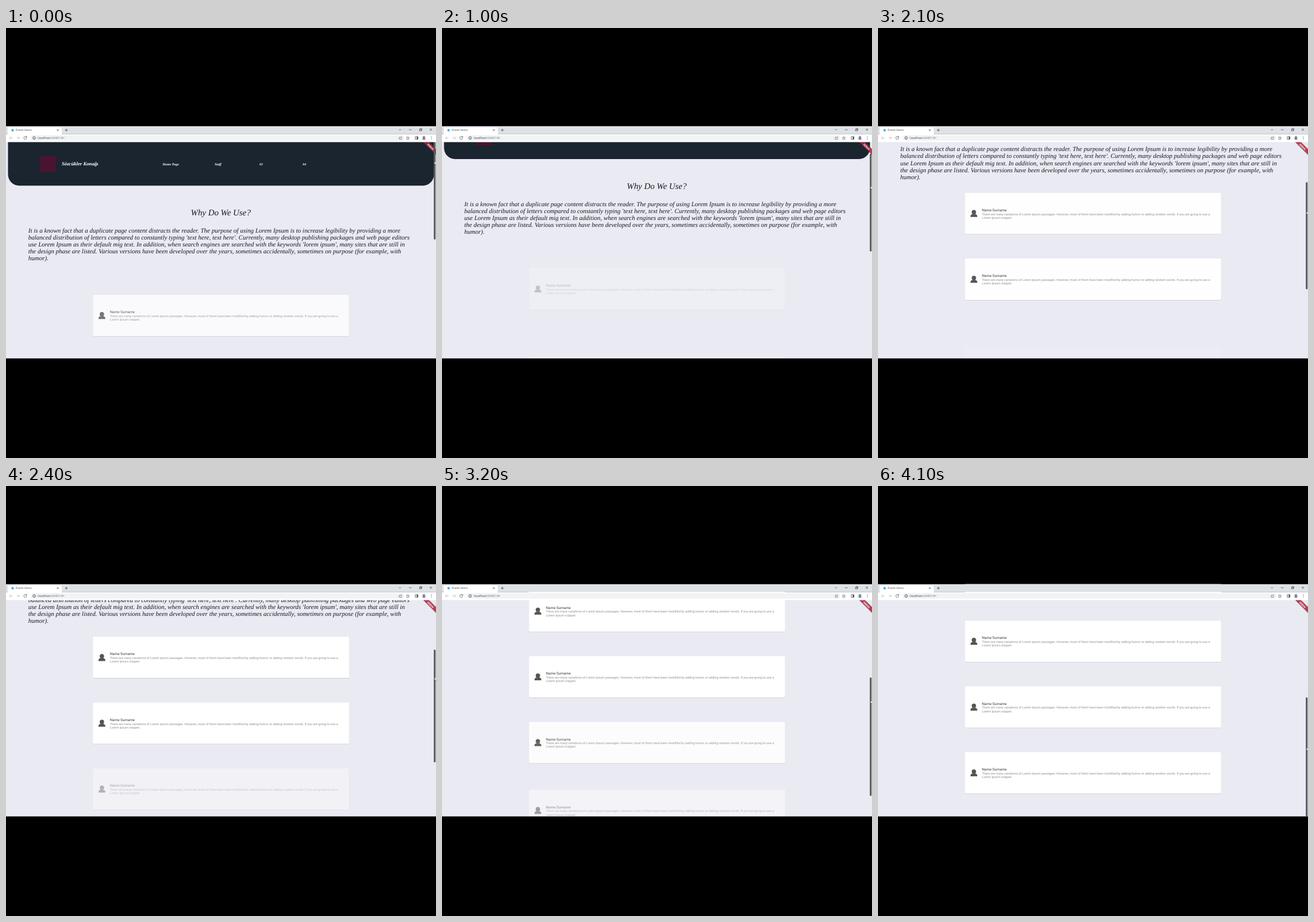
Write an HTML page that moves like this. It is 748 px wide and 748 px high and loops after 4.2 s.

```html
<!DOCTYPE html>
<html lang="en">
<head>
<meta charset="utf-8">
<title>Scrolling page</title>
<style>
  html, body { margin: 0; width: 100%; height: 100%; overflow: hidden; background: #000; }
  svg { display: block; width: 748px; height: 748px; text-rendering: geometricPrecision; }
  .serif { font-family: "Liberation Serif", serif; font-style: italic; fill: #171a21; }
  .nav { font-weight: bold; font-size: 5.9px; fill: #fff; }
  .card { font: 5.44px Roboto, sans-serif; fill: #8d8d8d; }
  .ui { font-family: "Open Sans", sans-serif; fill: #33363b; }
  .line { fill: none; stroke: #45484d; stroke-width: .8; }
</style>
</head>
<body>
<svg viewBox="0 0 748 748">
  <defs>
    <g id="card" class="card">
      <rect x="151.2" y=".8" width="445.6" height="71.8" rx="1.5" fill="#c9cad3"/>
      <rect x="151.2" width="445.6" height="71.8" rx="1.5" fill="#fff"/>
      <g fill="#555">
        <circle cx="166.8" cy="33.7" r="3.8"/>
        <path d="M160.9 42.1v-1.5c0-2.5 2.7-3.8 5.9-3.8s5.9 1.3 5.9 3.8v1.5z"/>
      </g>
      <text x="180.8" y="32.2" font-size="6.25" fill="#3a3a3a">Name Surname</text>
      <text x="180.8" y="38.9">There are many variations of Lorem Ipsum passages. However, most of them have been modified by adding humor or adding random words. If you are going to use a</text>
      <text x="180.8" y="45.1">Lorem Ipsum snippet.</text>
    </g>
  </defs>

  <rect y="198" width="748" height="377" fill="#e9eaf2"/>

  <g id="page" class="serif">
    <path d="M3.7 190H744.3V255a19 19 0 0 1-19 19.2H22.7a19 19 0 0 1-19-19.2z" fill="#2a1b3d"/>
    <path d="M3.7 190H744.3V254.2a19 19 0 0 1-19 19.2H22.7a19 19 0 0 1-19-19.2z" fill="#1a2530"/>
    <rect x="59" y="222" width="28" height="28" fill="#4a1431"/>
    <g class="nav">
      <text x="97" y="239.3" font-size="8.7">Sözcükler Konağı</text>
      <text x="272.5" y="238.5">Home Page</text>
      <text x="363" y="238.5">Staff</text>
      <text x="440.8" y="238.5">#3</text>
      <text x="516" y="238.5">#4</text>
    </g>
    <text x="321.5" y="326" font-size="14.9">Why Do We Use?</text>
    <g font-size="11">
      <text x="38.8" y="355.8">It is a known fact that a duplicate page content distracts the reader. The purpose of using Lorem Ipsum is to increase legibility by providing a more</text>
      <text x="38.8" y="367.9">balanced distribution of letters compared to constantly typing 'text here, text here'. Currently, many desktop publishing packages and web page editors</text>
      <text x="38.8" y="380">use Lorem Ipsum as their default mig text. In addition, when search engines are searched with the keywords 'lorem ipsum', many sites that are still in</text>
      <text x="38.8" y="392">the design phase are listed. Various versions have been developed over the years, sometimes accidentally, sometimes on purpose (for example, with</text>
      <text x="38.8" y="404">humor).</text>
    </g>
  </g>
  <g id="cards"></g>

  <path d="M725.2 198H735.4L748 210.6V220.8z" fill="#a3243a" opacity=".85"/>
  <text transform="translate(738.6 206.8) rotate(45)" y="1.6" text-anchor="middle" font-family="Roboto, sans-serif" font-weight="bold" font-size="4.4" fill="#fff">DEBUG</text>
  <rect id="thumb" x="744.2" width="3" rx="1.2" fill="#56585d"/>

  <!-- browser bar -->
  <rect y="170.6" width="748" height="14" fill="#dee1e6"/>
  <path d="M0 184.5H3V175q0-2 2-2H95q2 0 2 2V184.5H748V198.5H0z" fill="#fff"/>
  <rect x="42.5" y="186.5" width="650" height="9.6" rx="4.8" fill="#f1f3f4"/>
  <circle cx="11.5" cy="177.8" r="2.2" fill="#45b5e8"/>
  <g class="ui">
    <text x="17" y="179.4" font-size="4.5">Flutter Demo</text>
    <text x="55.3" y="193" font-size="5.3">localhost<tspan fill="#6f7378">:64401/#/</tspan></text>
  </g>
  <g class="line">
    <path d="M88.7 176.2l3 3m0-3l-3 3M102.5 177.7h5m-2.5-2.5v5"/>
    <path d="M11.5 191.2H6.3m2.4-2.4l-2.4 2.4l2.4 2.4M18.3 191.2h5.2m-2.4-2.4l2.4 2.4l-2.4 2.4" stroke="#b3b6ba"/>
    <path d="M35.5 189.6a2.5 2.5 0 1 0 .4 2.3M36 188.3v2h-2"/>
    <circle cx="49" cy="191.2" r="2.4"/>
    <path d="M49 191v1.5M49 189.5v.7"/>
    <path d="M683.5 176l1.8 1.8l1.8-1.8M701 177h4.5M737.3 175l3.6 3.6m0-3.6l-3.6 3.6"/>
    <path d="M719.3 176h3v3h-3zM720.3 176v-1h3v3h-1"/>
    <path d="M686 190h-2v3.5h4.5v-1.5M685.5 191.8q.5-2 3-2m-1.2-1.3l1.3 1.3l-1.3 1.3" stroke="#777b80"/>
    <path d="M699 188.7l.8 1.8l2 .2l-1.5 1.3l.5 2l-1.8-1l-1.8 1l.5-2l-1.5-1.3l2-.2z" stroke-width=".6"/>
    <path d="M712 189h4.6v4.5H712z"/>
    <path d="M715.5 189v4.5" stroke-width="1.8"/>
    <path d="M740 188.5v1m0 1.2v1m0 1.2v1" stroke-width="1"/>
  </g>
  <circle cx="727" cy="191.2" r="3.6" fill="#d5d9e2"/>
  <circle cx="727" cy="190" r="1.3" fill="#3d4350"/>
  <path d="M724.5 193.5q0-1.8 2.5-1.8t2.5 1.8z" fill="#3d4350"/>

  <path id="cursor" d="M0-3V2.6L1.3 1.5L2.2 3.2L3 2.8L2.2 1.2H3.8z" fill="#fff" stroke="#222" stroke-width=".4"/>
  <path d="M0 0H748V170.6H0zM0 574.7H748V748H0z"/>
</svg>

<script>
const LOOP = 4200, STEP = 100;
const VIEW_TOP = 198.3, VIEW = 376.5, CONTENT = 684.9;
const CARD_TOP = 428.2, PITCH = 114.4;

// [time, value] pairs
const scrollKeys = [[600, 0], [1000, 46.2], [1600, 119.7], [2100, 141.5], [2700, 190.3], [2900, 217], [3200, 246.6], [3600, 308.4]];
const cursorKeys = [[0, 235], [400, 257], [600, 257], [1000, 278], [1600, 309], [2100, 322], [2700, 349], [3200, 376], [4100, 458]];

// when each card starts to fade in, and when the extra gap above it closes
const cards = [
  { fade: 620, close: 1100, gap: 36 },
  { fade: 620, close: 1100, gap: 38.4 },
  { fade: 1850, close: 2105, gap: 38.4 },
  { fade: 2450, close: 2957, gap: 38.4 },
];

const $ = id => document.getElementById(id);
const clamp = x => Math.min(1, Math.max(0, x));
const smooth = x => x * x * (3 - 2 * x);

function sample(keys, t) {
  const next = keys.findIndex(k => k[0] > t);
  if (next < 0) return keys[keys.length - 1][1];
  if (next === 0) return keys[0][1];
  const [t0, a] = keys[next - 1], [t1, b] = keys[next];
  return a + (b - a) * (t - t0) / (t1 - t0);
}

for (const card of cards) {
  card.el = document.createElementNS("http://www.w3.org/2000/svg", "use");
  card.el.setAttribute("href", "#card");
  $("cards").append(card.el);
}

function draw(t) {
  const scroll = sample(scrollKeys, t);
  $("page").setAttribute("transform", `translate(0 ${-scroll})`);

  let extra = 0;
  cards.forEach((card, i) => {
    extra += card.gap * (1 - smooth(clamp((t - card.close) / 300)));
    const firstShow = i === 0 && t < 600;
    card.el.setAttribute("y", CARD_TOP + i * PITCH + extra - scroll);
    card.el.setAttribute("opacity", clamp(firstShow ? 0.78 + t / 1500 : (t - card.fade) / 1500));
  });

  const ratio = VIEW / (CONTENT + extra);
  $("thumb").setAttribute("y", VIEW_TOP + scroll * ratio);
  $("thumb").setAttribute("height", VIEW * ratio);
  $("cursor").setAttribute("transform", `translate(745.5 ${sample(cursorKeys, t)})`);
}

const start = performance.now();
function tick() {
  const t = (performance.now() - start) % LOOP;
  draw(Math.floor(t / STEP) * STEP);
  requestAnimationFrame(tick);
}
tick();
</script>
</body>
</html>
```
